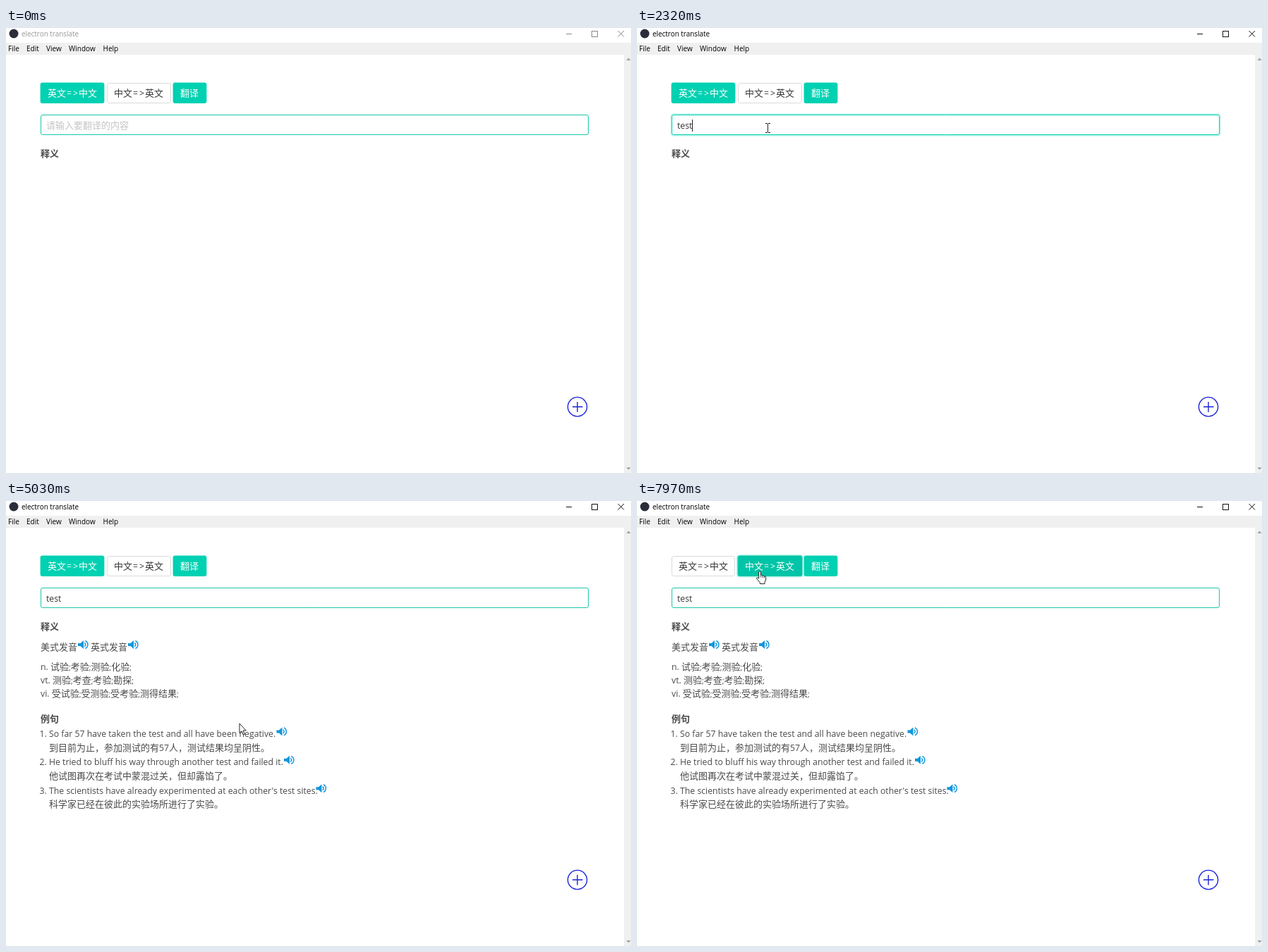
Animation, 886 px wide and 632 px high, one loop 8000 ms. Source, as an HTML page with a canvas:

```html
<!DOCTYPE html>
<html lang="zh">
<head>
<meta charset="utf-8">
<title>electron translate</title>
<style>
html, body { margin: 0; width: 100%; height: 100%; overflow: hidden; background: #fff; }
canvas { display: block; width: 886px; height: 632px; }
</style>
</head>
<body>
<canvas id="stage"></canvas>
<script>
const W = 886, H = 632, LOOP = 8000, STEP = 77;
const TEAL = '#00d1b2', INK = '#4a4a4a', DARK = '#363636', BLUE = '#0078d7';
const CJK = '"Noto Sans CJK SC", "Noto Sans CJK JP", sans-serif';
const LATIN = '"Open Sans", "Noto Sans", sans-serif';

const canvas = document.getElementById('stage');
const ctx = canvas.getContext('2d');
const ratio = window.devicePixelRatio || 1;
canvas.width = W * ratio;
canvas.height = H * ratio;

const between = (t, a, b) => t >= a && t < b;

// Latin, Chinese and symbols are drawn as separate runs on one baseline.
function say(str, x, y, { size = 13, color = INK, weight = 400 } = {}) {
  ctx.fillStyle = color;
  for (const run of str.match(/;|=>|[^;=\u0080-\uffff]+|[\u0080-\uffff]+/g)) {
    const wide = run.charCodeAt(0) > 127, arrow = run === '=>';
    const scale = wide ? 1 : run === ';' ? 0.81 : 0.945;
    const heft = wide && weight === 400 ? 350 : weight;
    ctx.font = `${heft} ${size * scale}px ${wide ? CJK : LATIN}`;
    ctx.letterSpacing = arrow ? '2px' : '0px';
    ctx.fillText(run, arrow ? x + 1 : x, y);
    x += ctx.measureText(run).width;
  }
  return x;
}

function rect(x, y, w, h, color) {
  ctx.fillStyle = color;
  ctx.fillRect(x, y, w, h);
}

function box(x, y, w, h, fill, border, glow) {
  const shape = (grow, r) => {
    ctx.beginPath();
    ctx.roundRect(x - grow, y - grow, w + 2 * grow, h + 2 * grow, r);
  };
  if (glow) {
    shape(1.7, 4.5);
    ctx.fillStyle = 'rgba(0,209,178,.25)';
    ctx.fill();
  }
  shape(0, 3);
  ctx.fillStyle = fill;
  ctx.fill();
  if (border) {
    shape(-0.5, 2.5);
    ctx.strokeStyle = border;
    ctx.lineWidth = 1;
    ctx.stroke();
  }
}

function lines(color, width, ...segments) {
  ctx.strokeStyle = color;
  ctx.lineWidth = width;
  ctx.beginPath();
  for (const [x1, y1, x2, y2] of segments) {
    ctx.moveTo(x1, y1);
    ctx.lineTo(x2, y2);
  }
  ctx.stroke();
}

function disc(x, y, r, color) {
  ctx.fillStyle = color;
  ctx.beginPath();
  ctx.arc(x, y, r, 0, 7);
  ctx.fill();
}

function polygon(points, color) {
  ctx.fillStyle = color;
  ctx.beginPath();
  points.forEach(([x, y]) => ctx.lineTo(x, y));
  ctx.fill();
}

function speaker(x, y) {
  const blue = '#1296db';
  ctx.save();
  ctx.translate(x, y);
  polygon([[0, 4], [3.5, 4], [8, 0], [8, 12], [3.5, 8], [0, 8]], blue);
  ctx.strokeStyle = blue;
  ctx.lineWidth = 1.5;
  for (const r of [2.7, 6]) {
    ctx.beginPath();
    ctx.arc(8, 6, r, -1.15, 1.15);
    ctx.stroke();
  }
  ctx.restore();
}

function drawWindow(active) {
  rect(0, 0, W, H, '#fff');
  disc(11, 8, 6.5, '#2b2e3a');
  say('electron translate', 22, 12, { size: 10.5, color: active ? '#000' : '#999' });
  const tone = active ? '#111' : '#888';
  lines(tone, 1, [794, 8.5, 802, 8.5], [867.5, 4, 876, 12.5], [876, 4, 867.5, 12.5]);
  ctx.strokeRect(830.5, 4.5, 8, 8);

  rect(0, 21, W, 17, '#f0f0f0');
  [['File', 3], ['Edit', 29], ['View', 57], ['Window', 89], ['Help', 137.5]]
    .forEach(([label, x]) => say(label, x, 33, { size: 10.6, color: '#000' }));

  rect(876, 38, 10, H - 38, '#f0f0f0');
  polygon([[879.5, 46], [885.5, 46], [882.5, 42.5]], '#a0a0a0');
  polygon([[879.5, 624], [885.5, 624], [882.5, 627.5]], '#a0a0a0');

  ctx.strokeStyle = '#1a22d8';
  ctx.lineWidth = 1.4;
  ctx.beginPath();
  ctx.arc(810, 538, 13.6, 0, 7);
  ctx.stroke();
  lines('#1a22d8', 1.4, [803, 538, 817.5, 538], [810, 531, 810, 545.5]);
}

function drawButtons(t) {
  const swapped = t >= 7965, hover = t >= 7200;
  const choice = (x, w, label, on, over) => {
    const fill = on ? (over ? '#00c4a7' : TEAL) : '#fff';
    const edge = on ? 0.4 : 0;
    box(x - edge, 78 - edge, w + 2 * edge, 29 + edge, fill,
      on ? null : over ? '#b5b5b5' : '#dbdbdb', on && over);
    say(label, x + 10, 97.3, { color: on ? '#fff' : DARK });
  };
  choice(49, 90, '英文=>中文', !swapped, false);
  choice(143, 91, '中文=>英文', swapped, hover);
  choice(237, 47, '翻译', true, false);
}

// Start time, text and word choices of each typing stage.
const typing = [
  [1460, 't', ['他', '天', '她', '听', '图', '太']],
  [1540, 'te', ['特', '特别', '特点', '特色', '特意', '特殊']],
  [1765, "te's", ['特殊', '特色', '特斯', '特使', '特首', '特赦']],
  [1850, "te's't", ['特殊体', '特斯特', '特使团', '特殊天', '特色图', '特殊题材']],
  [2010, 'test', ['特殊体', '特斯特', '特使团', '特殊天', '特色图', '特殊题材']],
  [2320, 'test', null],
];

function drawInput(t) {
  const focus = between(t, 730, 4330);
  box(49, 123, 777, 29, '#fff', focus ? TEAL : '#1cc7a8', focus);
  const stage = typing.filter(s => t >= s[0]).pop();
  let end = 57;
  if (stage) {
    end = say(stage[1], 57, 143.3, { color: DARK });
    if (stage[2]) rect(57, 146, end - 57, 1, DARK);
  } else {
    say('请输入要翻译的内容', 57, 143.2, { color: '#c4c4c4' });
  }
  const blinkOn = t < 1460 ? t < 1230 : t < 2320 || (t - 2320) % 1060 < 530;
  if (focus && blinkOn) rect(Math.floor(end), 130, 1, 17, '#222');
  return stage && stage[2];
}

function drawChoices(words) {
  const widths = words.map(w => 34.3 + 14 * w.length);
  const total = widths.reduce((a, b) => a + b, 4);
  rect(65, 149, total, 36, '#fff');
  rect(65, 149, total, 1, BLUE);
  rect(65, 184, total, 1, BLUE);
  rect(65, 149, widths[0] + 1, 36, BLUE);
  let x = 65;
  words.forEach((word, i) => {
    say(String(i + 1), x + 14.5, 172, { size: 11, color: i ? '#777' : '#fff' });
    say(word, x + 22.8, 172.8, { size: 14, color: i ? '#000' : '#fff' });
    x += widths[i];
  });
}

const examples = [
  ['So far 57 have taken the test and all have been negative.', '到目前为止，参加测试的有57人，测试结果均呈阴性。', 383.5],
  ['He tried to bluff his way through another test and failed it.', '他试图再次在考试中蒙混过关，但却露馅了。', 394],
  ["The scientists have already experimented at each other's test sites.", '科学家已经在彼此的实验场所进行了实验。', 439.5],
];

function drawResults(t) {
  say('释义', 49, 183, { weight: 700 });
  if (t < 3175) return;
  say('美式发音', 49, 212);
  speaker(102, 198);
  say('英式发音', 120, 212);
  speaker(173, 198);
  say('n. 试验;考验;测验;化验;', 49, 239.5);
  say('vt. 测验;考查;考验;勘探;', 49, 259);
  say('vi. 受试验;受测验;受考验;测得结果;', 49, 278.3);
  say('例句', 49, 314, { weight: 700 });
  if (t < 3340) return;
  examples.forEach(([en, zh, icon], i) => {
    const y = 335 + i * 40.4;
    say(i + 1 + '.', 47.5, y);
    say(en, 61, y);
    say(zh, 61, y + 19.5);
    speaker(icon, y - 13.6);
  });
}

// Pointer track: time, x, y, shape.
const track = [
  [70, 420, 478, 'arrow'], [380, 262, 260, 'arrow'], [600, 188, 150, 'beam'],
  [700, 185, 141.5, 'beam'], [3260, 185, 141.5, 'beam'], [3570, 150, 172, 'arrow'],
  [3800, 128, 199, 'beam'], [3950, 117, 205, 'hand'], [4025, 120, 212, 'beam'],
  [4100, 114, 203, 'hand'], [4180, 112, 201, 'hand'], [4645, 112, 201, 'arrow'],
  [5025, 330.5, 315.5, 'arrow'], [5300, 362, 329, 'beam'], [5485, 373, 336.5, 'beam'],
  [5700, 382, 337, 'beam'], [5790, 389, 335, 'hand'], [6100, 393, 331, 'hand'],
  [6573, 393, 331, 'arrow'], [6800, 325, 262, 'arrow'], [7050, 215, 138, 'arrow'],
  [7150, 184, 107, 'hand'], [7280, 174.3, 99, 'hand'], [8000, 174.3, 99, 'hand'],
];
const clicks = [[730, 810], [4330, 4490], [6415, 6500], [7890, 7965]];

const shapes = {
  arrow: new Path2D('M0 0V13.6L3 10.8L5.2 16L7.3 15.1L5.1 10H9.3Z'),
  hand: new Path2D('M-1.3 11V1.5Q0 -.4 1.4 1.5V6.3Q2.8 5.4 3.8 7Q5.4 6.1 6.3 7.9Q8.6 7.3 8.7 9.6V13L7 16V18.6H.3V16.8L-4.3 11.2Q-4.4 8.6 -1.3 11Z'),
};

function drawPointer(t) {
  const i = track.findIndex((k, n) => n + 1 < track.length && between(t, k[0], track[n + 1][0]));
  if (i < 0) return;
  const [t0, x0, y0, kind] = track[i], [t1, x1, y1] = track[i + 1];
  const p = Math.floor((t - t0) / STEP) * STEP / (t1 - t0);
  const x = x0 + (x1 - x0) * p, y = y0 + (y1 - y0) * p;
  if (clicks.some(c => between(t, ...c))) disc(x, y, 9.8, 'rgba(242,236,20,.6)');

  ctx.save();
  ctx.translate(Math.round(x), Math.round(y));
  if (kind === 'beam') {
    lines('#222', 1, [0.5, -6, 0.5, 6], [-3, -6.5, 0, -6.5], [1, -6.5, 4, -6.5],
      [-3, 6.5, 0, 6.5], [1, 6.5, 4, 6.5]);
  } else {
    ctx.fillStyle = '#fff';
    ctx.fill(shapes[kind]);
    ctx.strokeStyle = '#222';
    ctx.lineWidth = 1;
    ctx.lineJoin = 'round';
    ctx.stroke(shapes[kind]);
    if (kind === 'hand') lines('#222', 0.8, [1.4, 6.3, 1.4, 9.5], [3.9, 7, 3.9, 10], [6.3, 8, 6.3, 10.5]);
  }
  ctx.restore();
}

function draw(now) {
  const t = now % LOOP;
  ctx.setTransform(ratio, 0, 0, ratio, 0, 0);
  drawWindow(t >= 730);
  drawButtons(t);
  const words = drawInput(t);
  drawResults(t);
  if (words) drawChoices(words);
  drawPointer(t);
}

const start = performance.now();
function frame() {
  draw(performance.now() - start);
  requestAnimationFrame(frame);
}
frame();
</script>
</body>
</html>
```
